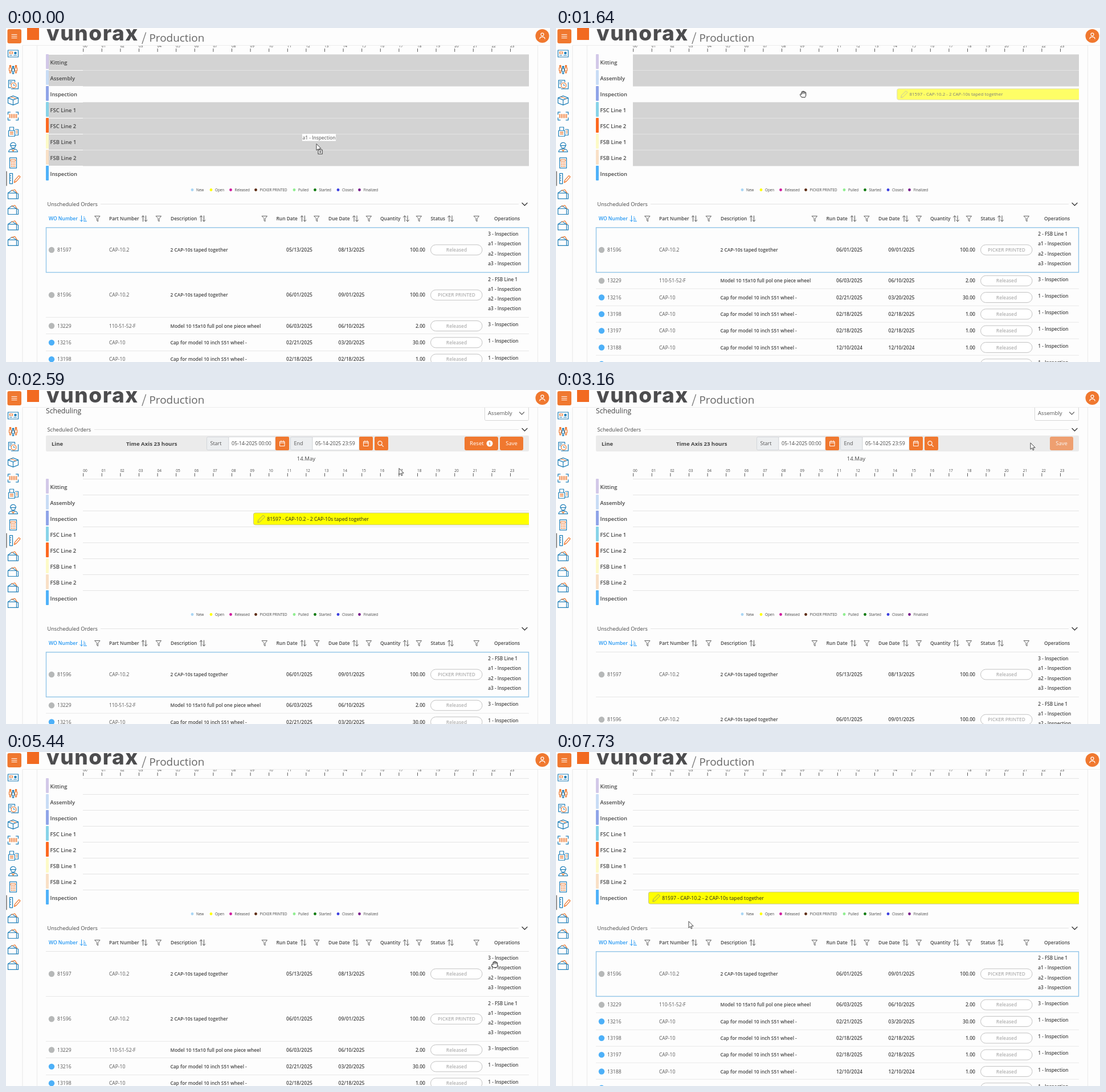
Animation, 955 px wide and 587 px high, one loop 8000 ms. Source, as an HTML page:

```html
<!DOCTYPE html>
<html lang="en">
<head>
<meta charset="utf-8">
<title>Production scheduling</title>
<style>
html, body { margin: 0; width: 100%; height: 100%; overflow: hidden; background: #fdfdfd; }
svg { position: fixed; left: 0; top: 0; display: block; }
text { font-family: "Open Sans", "Noto Sans", sans-serif; white-space: pre; }
</style>
</head>
<body>
<svg id="stage" width="955" height="587" viewBox="0 0 955 587"></svg>
<script>
const ORANGE = '#f0782f', BLUE = '#1f7fb8', INK = '#444', EDGE = '#e4e4e4', GREY = '#d3d3d3';
const LOOP = 8000, BIG = 79.3, SMALL = 29.3, TABLE_TOP = 350.3;

// ---- drawing helpers ----
const text = (x, y, s, size, fill = INK, weight = 400, anchor = 'start') =>
  `<text x="${x}" y="${y}" font-size="${size}" fill="${fill}" font-weight="${weight}" text-anchor="${anchor}">${s}</text>`;
const rect = (x, y, w, h, fill, rx = 0, stroke = 'none') =>
  `<rect x="${x}" y="${y}" width="${w}" height="${h}" rx="${rx}" fill="${fill}" stroke="${stroke}"/>`;
const dot = (x, y, r, fill) => `<circle cx="${x}" cy="${y}" r="${r}" fill="${fill}"/>`;
const line = (x1, x2, y, stroke = EDGE) => `<path d="M${x1} ${y}H${x2}" stroke="${stroke}"/>`;
const path = (d, stroke, w = 1, fill = 'none') =>
  `<path d="${d}" stroke="${stroke}" stroke-width="${w}" fill="${fill}" stroke-linecap="round" stroke-linejoin="round"/>`;
const at = (x, y, body, id = '') => `<g ${id && `id="${id}"`} transform="translate(${x} ${y})">${body}</g>`;
const range = (n, f) => Array.from({ length: n }, (_, i) => f(i)).join('');

// ---- top bar and side menu ----
const topBar = () =>
  rect(0, 0, 955, 30, '#fdfdfd') + line(29, 955, 30.5, '#ececec') +
  rect(2.5, 2, 24.5, 25, ORANGE, 3) + path('M10 11.5h9M10 14.5h9M10 17.5h9', '#fff', 1.1) +
  rect(37, 0, 21, 21, '#f26a21') +
  `<text x="71" y="22" font-size="37" font-weight="800" letter-spacing="1.5" fill="#4d4d4f" style="font-family:Inter,sans-serif">vunorax</text>` +
  path('M239 27.5L245.5 8', '#777', 1.3) + text(251.5, 23.7, 'Production', 18.9, '#666') +
  dot(941.5, 14, 12, ORANGE) + `<circle cx="941.5" cy="11.3" r="2.5" fill="none" stroke="#fff" stroke-width="1.2"/>` +
  path('M937 19c0-4.500 9-4.500 9 0', '#fff', 1.2);

const folder = path('M-9-2h15l3 1.500v8.500h-18zM6-2v10', BLUE, 1.2) + path('M-9-2l7-5 8 5', BLUE, 1.1) + path('M-3-6l6-2 4 6', ORANGE, 1.2);
const person = (x, y, c) => dot(x, y - 5, 2, c) + path(`M${x - 2} ${y - 2}h4v5h-1v4h-2v-4h-1z`, c, 1.2);
const icons = [
  path('M-9-6h18v12h-18zM-6 3h4M1 3h5', BLUE, 1.2) + path('M-6-3h5v3h-5z', ORANGE, 1.2) + dot(4, -1, 2.3, BLUE),
  person(-5, -.5, ORANGE) + person(5, -.5, ORANGE) + person(0, 1, BLUE),
  path('M-8-8h11v3M-8-8v13h4M-3 7h12v-11M-6-5h4M-6-2h2', BLUE, 1.2) + `<circle cx="1" cy="1" r="4.4" fill="none" stroke="${ORANGE}" stroke-width="1.2"/>` + path('M1-1v2h2', BLUE),
  path('M0-8l9 3.500v9L0 8l-9-3.500v-9zM-9-4.500L0-1l9-3.500M0-1v9', BLUE, 1.2) + path('M-4-6.300L5-3', ORANGE),
  path('M-9-3v-4h4M9-3v-4h-4M-9 3v4h4M9 3v4h-4', BLUE, 1.3) + path('M-6-3v6M-3-3v6M0-3v6M3-3v6M6-3v6', ORANGE, 1.5),
  path('M-8-2h11v10h-11zM-6-2v-6h7v6M4-4h5v10h-5', BLUE, 1.2) + path('M-5 1h5M-5 4h5M6-1h1M6 2h1', ORANGE, 1.3),
  path('M-8 8c0-7 16-7 16 0zM-4-3c0 6 8 6 8 0', BLUE, 1.2) + path('M-5-3c0-7 10-7 10 0z', BLUE, 1.2) + path('M-2 4l2 3 2-3', ORANGE, 1.3),
  path('M-6-9h12v18h-12z', BLUE, 1.2) + path('M-4-6h8v3h-8z', ORANGE) + path('M-3 0h.1M0 0h.1M3 0h.1M-3 3h.1M0 3h.1M3 3h.1M-3 6h.1M0 6h.1M3 6h.1', ORANGE, 1.9),
  path('M-6-9h5v18h-5zM-6-5h2M-6-1h2M-6 3h2', BLUE, 1.3) + path('M2 7l1-4 7-8 2.500 2-7 8z', ORANGE, 1.3),
  folder, folder, folder, folder
];
const sideBar = () => path('M29 31V587', '#e6e6e6') + path('M1 252V277', '#555', 1.2) +
  icons.map((g, i) => at(12.5, 45 + 27.45 * i, g)).join('');

// ---- schedule ----
const chevron = y => path(`M906 ${y - 2}l4.500 4.500 4.500-4.500`, '#333', 1.3);
const calendar = path('M-4-3.500h8v8h-8zM-4-1h8M-2-5v2M2-5v2', '#fff');
const field = (x, w, name, value) =>
  rect(x, -27.5, w, 23, '#eceef0', 2, '#d3d6da') + text(x + 6, -13, name, 9, '#555') +
  rect(x + w, -27.5, 82, 23, '#fff', 0, '#d8dade') + text(x + w + 5, -12.9, value, 8.7, '#444') +
  rect(x + w + 82, -28, 24, 24, ORANGE, 2) + at(x + w + 94, -16, calendar);

const toolbar = () =>
  text(70, -69.5, 'Scheduling', 12.2, INK, 500) +
  rect(840.5, -85, 77, 28.5, '#fff', 2, '#d6d6d6') + text(846, -66.5, 'Assembly', 9.6, '#555') +
  path('M901.500-71l4 4 4-4', '#666', 1.2) +
  text(72.5, -37, 'Scheduled Orders', 9.2) + line(155, 900, -40.5) + chevron(-40.5) +
  rect(70, -30, 848, 28, '#ebebeb', 2) +
  text(80, -12.5, 'Line', 9.5, INK, 700) + text(211, -12.5, 'Time Axis 23 hours', 9.6, INK, 700) +
  field(352.5, 38.5, 'Start', '05-14-2025 00:00') + field(499.5, 38.5, 'End', '05-14-2025 23:59') +
  rect(647, -28, 24, 24, ORANGE, 2) +
  '<circle cx="656.5" cy="-16.5" r="3.6" fill="none" stroke="#fff" stroke-width="1.2"/>' + path('M659.300-13.700l3 3', '#fff', 1.2) +
  `<g id="reset">${rect(805, -28, 59, 24, ORANGE, 3)}${text(814, -12.7, 'Reset', 9.6, '#fff')}${dot(849, -16, 5.5, '#fff')}${text(849, -13.2, '1', 7.5, ORANGE, 700, 'middle')}</g>` +
  `<g id="save">${rect(867, -28, 41, 24, ORANGE, 3)}${text(887.5, -12.7, 'Save', 9.4, '#fff', 400, 'middle')}</g>` +
  text(527, 14.3, '14.May', 9.6, INK, 400, 'middle');

const axis = () => range(24, i => {
  const x = 135.5 + 32.6 * i;
  return text(x - .3, 34, String(i).padStart(2, '0'), 6.5) + path(`M${x + .2} 36.500v5`, '#444', .9);
});

const lines = [['Kitting', '#d2c8e8'], ['Assembly', '#c8dcf5'], ['Inspection', '#8fa4e8'], ['FSC Line 1', '#87d3e8'],
  ['FSC Line 2', '#fd6920'], ['FSB Line 1', '#fdfac6'], ['FSB Line 2', '#f9e0c6'], ['Inspection', '#4fb1f9']];
const shade = (x, w) => lines.map(([name], i) => name === 'Inspection' ? '' : rect(x, 47 + 28 * i, w, 27, GREY)).join('');
const grid = () =>
  `<g id="blocked">${shade(135, 783)}</g><g id="blockedNames">${shade(75, 60)}</g>` +
  lines.map(([name, fill], i) => {
    const y = 46 + 28 * i;
    return line(135, 918, y + .5) + rect(70, y, 5, 26, fill, 1) + text(77.5, y + 18, name, 9.45, INK, 600);
  }).join('');

const legend = () => [[327, 'New', '#a9d6f5'], [360, 'Open', '#ffff00'], [394.5, 'Released', '#cf1a9e'],
  [438.5, 'PICKER PRINTED', '#5c2a0e'], [506, 'Pulled', '#90ee90'], [542.5, 'Started', '#0b7a0b'],
  [583, 'Closed', '#3b3fe0'], [620.5, 'Finalized', '#7a1f8c']]
  .map(([x, s, c]) => dot(x, 284.5, 2.4, c) + text(x + 7, 287, s, 6.3, INK, 500)).join('');

// ---- orders table ----
const funnel = path('M-4.500-4.500h9l-3.500 4.500v5l-2-1.500v-3.500z', '#555', .9);
const sorter = path('M-2.500 5V-5M-5-2.500l2.500-2.500 2.500 2.500M2.500-5V5M0 2.500l2.500 2.500 2.500-2.500', '#555', 1);
const sorted = path('M-3-5V5M-5.500 2.500l2.500 2.500 2.500-2.500M1-3h1M1-.5h2.500M1 2h3.500M1 4.500h5', '#2196f3', 1);
const tableHead = () =>
  text(72.5, 313, 'Unscheduled Orders', 9.2) + line(166, 900, 309.5) + chevron(309.5) +
  text(75, 338, 'WO Number', 8.5, '#2196f3', 600) + at(135.5, 335, sorted) +
  [[181, 'Part Number', 243], [289, 'Description', 345], [474.5, 'Run Date', 522], [566, 'Due Date', 613.5],
    [657, 'Quantity', 702.5], [745.5, 'Status', 780.5]]
    .map(([x, s, sx]) => text(x, 338, s, 8.4, INK, 600) + at(sx, 335, sorter)).join('') +
  text(857, 338, 'Operations', 8.4, INK, 600) +
  [160.5, 268, 454, 545.5, 637, 725, 826].map(x => at(x, 335, funnel)).join('') + line(70, 918, 350.5);

const wheel = 'Cap for model 10 inch S51 wheel -', taped = '2 CAP-10s taped together';
const tail = ['a1', 'a2', 'a3'].map(s => s + ' - Inspection');
const cap = (wo, date, due = date, qty = '1.00') =>
  [wo, 'CAP-10', wheel, date, due, qty, 'Released', ['1 - Inspection']];
const orders = [
  ['81597', 'CAP-10.2', taped, '05/13/2025', '08/13/2025', '100.00', 'Released', ['3 - Inspection', ...tail]],
  ['81596', 'CAP-10.2', taped, '06/01/2025', '09/01/2025', '100.00', 'PICKER PRINTED', ['2 - FSB Line 1', ...tail]],
  ['13229', '110-51-52-F', 'Model 10 15x10 full pol one piece wheel', '06/03/2025', '06/10/2025', '2.00', 'Released', ['3 - Inspection']],
  cap('13216', '02/21/2025', '03/20/2025', '30.00'), cap('13198', '02/18/2025'), cap('13197', '02/18/2025'),
  cap('13188', '12/10/2024'), cap('13187', '12/10/2024')
];
const woCell = (wo, y, fill) => dot(80, y, 5.2, fill) + text(90, y + 3.1, wo, 8.6, '#555');
const row = ([wo, part, desc, run, due, qty, status, ops], y) => {
  const h = ops.length > 1 ? BIG : SMALL, m = y + h / 2, b = m + 3.1;
  return woCell(wo, m, part === 'CAP-10' ? '#4db0f8' : '#b6b8b8') + text(181, b, part, 8.5, '#555') +
    text(288.5, b, desc, 8.3, INK, 600) + text(515, b, run, 8.6, INK, 600, 'middle') +
    text(606.5, b, due, 8.6, INK, 600, 'middle') + text(736, b, qty, 8.6, INK, 600, 'end') +
    rect(745.5, m - 9, 90.5, 18, '#fff', 9, '#c2c2c2') + text(791, b, status, 8.4, '#b0b0b0', 600, 'middle') +
    ops.map((s, i) => text(846.3, y + 15 + 17.15 * i, s, 8.25, INK, 600)).join('') +
    line(70, 918, Math.round(y + h) - .5, '#e8e8e8');
};
const otherRows = () => {
  let y = TABLE_TOP + BIG;
  return orders.slice(1).map(o => {
    const s = row(o, y);
    y += o[7].length > 1 ? BIG : SMALL;
    return s;
  }).join('');
};

// ---- floating parts ----
const booking = `<g id="booking">${rect(0, -10.5, 4024, 21, '#ffff00', 3, '#c4c49a')}` +
  path('M7.500 6l1-4 8.500-8.500 3 3L11.500 5z', '#8f8f78', .9) +
  text(23.7, 3.2, '81597 - CAP-10.2 - ' + taped, 8.7, '#222') + '</g>';
const arrow = path('M0 0v11l2.600-2.400 1.700 4 1.700-.8-1.700-3.800h3.500z', '#333', .9, '#fff');
const copyBadge = rect(3, 10.3, 7.2, 7, '#fff', 0, '#333') + path('M5 13.800h3.400M6.700 12.100v3.400', '#333', .9);
const hand = path('M-3 5.500C-5 3-6 1-5 0s2 1 2 1v-4c0-1.500 1.800-1.500 1.800 0v-1c0-1.500 2-1.500 2 0v.6c0-1.400 2-1.400 2 0v.9c0-1.200 1.900-1.200 1.900.2V2c0 2-1 2.500-1.400 3.500z', '#222', 1, '#fff') +
  path('M-1.200-3v2.500M.8-3.500v3M2.800-2.800v2.300', '#222', .8);

document.getElementById('stage').innerHTML =
  `<defs><clipPath id="body"><rect x="30" y="31" width="925" height="556"/></clipPath>
   <clipPath id="lanes"><rect x="135" y="-100" width="783" height="400"/></clipPath></defs>` +
  rect(0, 0, 955, 587, '#fdfdfd') + path('M54.500 31V587M933.500 31V587', '#ebebeb') +
  `<g clip-path="url(#body)"><g id="page">` + toolbar() + axis() + grid() +
  `<g clip-path="url(#lanes)">${booking}</g>` + legend() + tableHead() +
  `<g id="first">${row(orders[0], TABLE_TOP)}</g><g id="rest">${otherRows()}</g>` +
  `<rect id="pick" x="70.5" y="350.8" width="847" height="78.7" fill="none" stroke="#93c6e9" stroke-width="1.4"/></g></g>` +
  topBar() + sideBar() +
  at(0, 0, rect(-25, -18, 59, 12.5, '#fff') + text(-24.5, -8.5, tail[0], 8.25, '#777', 600), 'opGhost') +
  at(0, 0, rect(-32, -26, 97, 44, '#fafafa') + at(-98, -390.3, woCell('81597', 390, '#a8a8a8')), 'woGhost') +
  at(0, 0, `<g id="arrow">${arrow}</g><g id="badge">${copyBadge}</g><g id="hand">${hand}</g>`, 'cursor');

const el = {};
document.querySelectorAll('#stage [id]').forEach(n => el[n.id] = n);

// ---- timing ----
const clamp = v => Math.max(0, Math.min(1, v));
const smooth = p => p * p * (3 - 2 * p);
const track = (keys, t, ease = p => p) => {
  let i = 0;
  while (i < keys.length - 2 && t >= keys[i + 1][0]) i++;
  const [a, b] = [keys[i], keys[i + 1]], p = ease(clamp((t - a[0]) / (b[0] - a[0])));
  return a.slice(1).map((v, k) => v + (b[k + 1] - v) * p);
};
// The screen refreshes in bursts: first, last, count.
const beats = [0];
[[100, 880, 9], [980, 1250, 4], [1440, 1740, 4], [1940, 1940, 1], [2140, 2590, 6], [2680, 2880, 3], [2970, 3740, 9],
  [3840, 4580, 9], [4670, 4970, 4], [5260, 5980, 9], [6070, 6820, 9], [6910, 7090, 3], [7270, 7730, 6]]
  .forEach(([a, b, n]) => { for (let i = 0; i < n; i++) beats.push(a + (n > 1 ? (b - a) * i / (n - 1) : 0)); });

const moves = [[0, 545, 204], [880, 464, 118], [1250, 436, 119], [1440, 434, 116], [2100, 434, 116],
  [2590, 690, 138], [2880, 833, 92], [3200, 833, 94], [3740, 825, 190], [4580, 868, 431], [4970, 862, 410],
  [5200, 862, 410], [5440, 858, 373], [5980, 238, 385], [6300, 98, 390], [6400, 98, 390], [6820, 158, 257],
  [7090, 163, 254], [7270, 163, 254], [7730, 233, 298]];
const scrolls = [[2080, 0], [2430, 110], [3640, 110], [3740, 61.5], [3840, 18], [3930, 0]];
const RESET = 3060, GRAB = 6350, DROP1 = 1440, DROP2 = 7270;

const show = (n, on) => n.setAttribute('display', on ? 'inline' : 'none');
const fade = (n, o) => n.setAttribute('opacity', o);
const move = (n, x, y) => n.setAttribute('transform', `translate(${x.toFixed(2)} ${y.toFixed(2)})`);

function draw(t) {
  const [x, y] = track(moves, t, smooth), [scroll] = track(scrolls, t);
  const second = t >= DROP2;
  const booked = t >= DROP1 + 60 && t < RESET || t >= DROP2 + 60;
  const drag1 = t < DROP1, drag2 = t >= GRAB && t < DROP2;

  move(el.page, 0, scroll);
  show(el.first, !booked);
  move(el.rest, 0, booked ? -BIG : 0);
  show(el.pick, t < RESET || t >= GRAB);
  show(el.reset, booked);
  fade(el.save, booked ? 1 : .65);
  fade(el.blocked, 1 - clamp((t - 1660) / 120));
  show(el.blockedNames, drag1);

  // The bar zooms in about its own far-off centre.
  const p = clamp((t - (second ? DROP2 : DROP1) - 55) / 245), k = .8 + .2 * p;
  show(el.booking, booked);
  fade(el.booking, p);
  el.booking.setAttribute('transform',
    `translate(${(second ? 162.5 : 434.5) + 2012 * (1 - k)} ${second ? 256.5 : 116.5}) scale(${k})`);

  const grip = t >= DROP1 && t < 2140 || t >= 4400 && t < 5500 || t >= 6200 && t < GRAB;
  show(el.hand, grip);
  show(el.arrow, !grip);
  show(el.badge, drag1 || drag2);
  show(el.opGhost, drag1);
  show(el.woGhost, drag2);
  fade(el.woGhost, .65);
  [el.cursor, el.opGhost, el.woGhost].forEach(n => move(n, x, y));
}

function tick(now) {
  const t = now % LOOP;
  draw(beats.filter(b => b <= t + 1).pop());
  requestAnimationFrame(tick);
}
draw(0);
requestAnimationFrame(tick);
</script>
</body>
</html>
```
